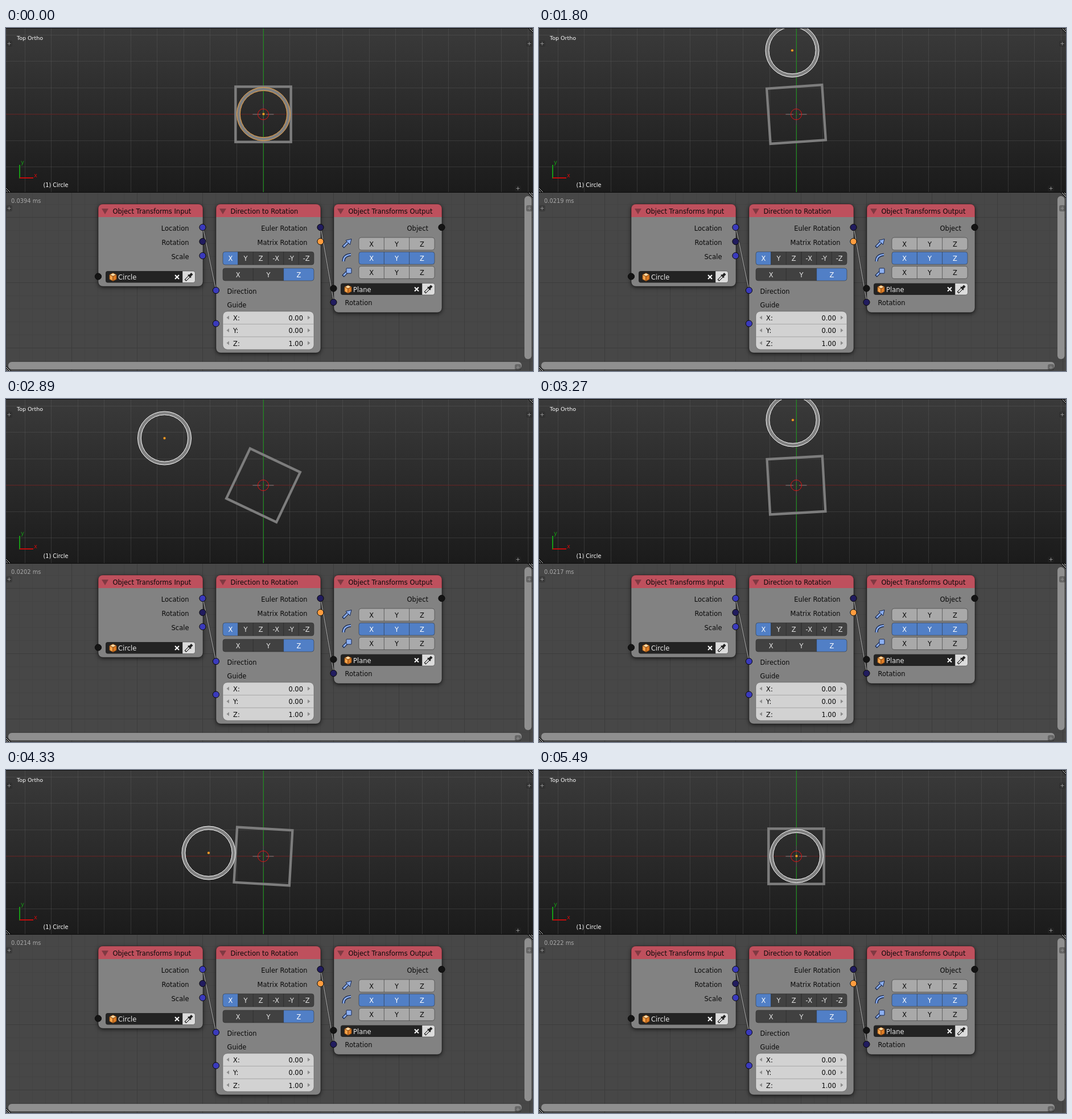
Animation, 926 px wide and 604 px high, one loop 5530 ms. Source, as an HTML page with a canvas:

```html
<!DOCTYPE html>
<html>
<head>
<meta charset="utf-8">
<title>Direction to Rotation</title>
<style>
html, body { margin: 0; width: 100%; height: 100%; overflow: hidden; background: #1a1a1a; }
canvas { display: block; }
</style>
</head>
<body>
<canvas id="stage" width="926" height="604"></canvas>
<script>
const c = document.getElementById('stage').getContext('2d');
const LOOP = 5530, STEPS = 119, CX = 452.5, CY = 151.5;
const BLUE = '#3a3abb', NAVY = '#211c5e', BLACK = '#141414', ORANGE = '#ff9d3f';
const SELECTED = '#517fc6', INK = '#0a0a0a';

// Key points of the hand-dragged circle: step, x, y
const drag = [[0, CX, CY], [13, 501, 142], [23, 595.5, 138.5], [26, 595, 126], [39, 445, 39.5], [51, 308, 63],
  [62, 278.5, 69], [70, 446, 37], [75, 601, 88], [79, 473, 40.5], [88, 320, 118], [93, 356, 146],
  [104, 425, 163], [112, CX, CY]];

// Cubic Hermite curve through the key points
function position(step) {
  const last = drag.length - 1;
  if (step >= drag[last][0]) return [CX, CY];
  const i = drag.findIndex(p => p[0] > step) - 1;
  const a = drag[i], b = drag[i + 1], d = b[0] - a[0], u = (step - a[0]) / d;
  const slope = (j, k) => {
    const p = drag[Math.max(j - 1, 0)], n = drag[Math.min(j + 1, last)];
    return (n[k] - p[k]) / (n[0] - p[0]);
  };
  return [1, 2].map(k =>
    (1 + 2 * u) * (1 - u) ** 2 * a[k] + u * (1 - u) ** 2 * d * slope(i, k) +
    u * u * (3 - 2 * u) * b[k] + u * u * (u - 1) * d * slope(i + 1, k));
}

// Measured run time: slow at first, then steady with jitter
function runTime(step) {
  const noise = Math.abs(Math.sin(step * 127.1) * 437) % 1;
  const units = step < 30 ? 394 - noise * 26 : 224 - noise * 38;
  return '0.0' + Math.round(units) + ' ms';
}

function line(points, color, width = 1) {
  c.beginPath();
  points.forEach(([x, y]) => c.lineTo(x, y));
  c.strokeStyle = color;
  c.lineWidth = width;
  c.stroke();
}

function paint(fill, stroke, width = 1) {
  if (fill) { c.fillStyle = fill; c.fill(); }
  if (stroke) { c.strokeStyle = stroke; c.lineWidth = width; c.stroke(); }
}

function poly(points, fill, stroke) {
  c.beginPath();
  points.forEach(([x, y]) => c.lineTo(x, y));
  c.closePath();
  paint(fill, stroke);
}

function box(x, y, w, h, r, fill, stroke) {
  c.beginPath();
  c.roundRect(x, y, w, h, r);
  paint(fill, stroke);
}

function disc(x, y, r, fill, stroke, width) {
  c.beginPath();
  c.arc(x, y, r, 0, 7);
  paint(fill, stroke, width);
}

function text(s, x, y, color = INK, align = 'left', size = 11.5) {
  c.font = size + 'px "DejaVu Sans", sans-serif';
  c.textAlign = align;
  c.fillStyle = color;
  c.fillText(s, x, y);
}

function grid(x0, y0, step, top, bottom, color) {
  for (let x = x0; x < 926; x += step) line([[Math.floor(x) + .5, top], [Math.floor(x) + .5, bottom]], color);
  for (let y = y0; y < bottom; y += step) line([[0, Math.floor(y) + .5], [926, Math.floor(y) + .5]], color);
}

function areaMarks(top, bottom) {
  for (let d = 0; d < 9; d += 2) {
    const color = d % 4 ? '#b0b0b0' : '#080808';
    line([[917 + d, top], [926, top + 9 - d]], color);
    line([[0, bottom - 9 + d], [9 - d, bottom]], color);
  }
  for (const [x, y] of [[5.5, top + 27.5], [919.5, top + 27.5], [899.5, bottom - 6.5]]) {
    box(x - 5.5, y - 5.5, 11, 11, 3, 'rgba(40,40,40,.4)');
    line([[x - 3, y], [x + 3, y]], '#8c8c8c');
    line([[x, y - 3], [x, y + 3]], '#8c8c8c');
  }
}

function viewport(step) {
  c.save();
  c.beginPath();
  c.rect(0, 1, 926, 288);
  c.clip();
  const shade = c.createLinearGradient(0, 0, 0, 289);
  shade.addColorStop(0, '#3a3a3a');
  shade.addColorStop(1, '#1b1b1b');
  c.fillStyle = shade;
  c.fillRect(0, 0, 926, 289);
  grid(33, 12.1, 46.55, 0, 289, 'rgba(100,100,100,.34)');
  line([[0, 152], [926, 152]], '#621a1a');
  line([[452.5, 0], [452.5, 289]], '#159015');

  const [x, y] = position(step);
  c.save();
  c.translate(452, 152);
  c.rotate(Math.atan2(y - CY, x - CX));
  c.strokeStyle = '#7d7d7d';
  c.lineWidth = 4.3;
  c.strokeRect(-48.7, -48.7, 97.4, 97.4);
  c.restore();

  const edge = step ? '#fff' : '#f5a542';
  disc(x, y, 44, null, '#808080', 6);
  disc(x, y, 47, null, edge);
  disc(x, y, 41.2, null, edge);
  disc(x, y, 2.3, '#ffa02d', '#5a3a10', .6);

  for (const s of [-1, 1]) {
    line([[452 + s * 5, 152], [452 + s * 18.5, 152]], '#808080');
    line([[452.5, 152 + s * 5], [452.5, 152 + s * 18.5]], '#4a564a');
  }
  disc(452, 152, 9.5, null, '#e41212');

  line([[24, 241], [24, 265]], '#169a16', 2);
  line([[24, 264], [48, 264]], '#c40c0c', 2);
  text('y', 26, 240, '#169a16', 'left', 10);
  text('x', 49, 263, '#c40c0c', 'left', 10);
  text('Top Ortho', 19, 20.5, '#fff', 'left', 9.5);
  text('(1) Circle', 65.5, 279.5, '#fff', 'left', 9.7);
  areaMarks(0, 289);
  c.restore();
}

function node(x, w, h, title) {
  c.save();
  c.shadowColor = 'rgba(0,0,0,.65)';
  c.shadowBlur = 7;
  c.shadowOffsetY = 2;
  box(x, 310, w, h, 8, '#828282');
  c.restore();
  box(x, 310, w, 23, [8, 8, 0, 0], '#be505d');
  box(x, 310, w, h, 8, null, 'rgba(0,0,0,.4)');
  poly([[x + 6, 318], [x + 18, 318], [x + 12, 328]], '#803942');
  text(title, x + 25.5, 327);
}

function socket(x, y, color) {
  disc(x, y, 5.6, color, '#080808', 1);
}

function buttons(x, y, w, h, labels, isOn, off, ink) {
  const step = w / labels.length;
  c.save();
  c.beginPath();
  c.roundRect(x, y, w, h, 4);
  c.clip();
  labels.forEach((s, i) => {
    const on = isOn(i), left = x + i * step;
    c.fillStyle = on ? SELECTED : off;
    c.fillRect(left, y, step, h);
    if (i) line([[left, y], [left, y + h]], 'rgba(0,0,0,.4)');
    text(s, left + step / 2, y + h / 2 + 4.5, on ? '#fff' : ink, 'center');
  });
  c.restore();
  box(x, y, w, h, 4, null, 'rgba(40,40,40,.5)');
}

function picker(x, y, w, name) {
  const m = y + 10.5, e = x + w, k = x + 13, rim = '#8c4a12';
  box(x, y, w, 20.5, [4, 0, 0, 4], '#232323');
  box(e, y, 22.5, 20.5, [0, 4, 4, 0], '#dcdcdc', 'rgba(40,40,40,.5)');
  poly([[k - 6, m - 4], [k, m - 7], [k + 6, m - 4], [k, m - 1]], '#ffdda8', rim);
  for (const [s, fill] of [[-1, '#f6a44a'], [1, '#df7d25']])
    poly([[k + 6 * s, m - 4], [k, m - 1], [k, m + 7], [k + 6 * s, m + 4]], fill, rim);
  text(name, x + 22, m + 4.5, '#e6e6e6');
  for (const s of [-1, 1]) line([[e - 13, m - 3.5 * s], [e - 6, m + 3.5 * s]], '#fff', 2);
  line([[e + 5, m + 6], [e + 13, m - 2]], '#222', 4);
  line([[e + 6, m + 5], [e + 12, m - 1]], '#fff', 1.8);
  line([[e + 10, m - 4], [e + 15, m + 1]], '#222', 2.2);
  line([[e + 13, m - 2], [e + 17, m - 6]], '#222', 4.5);
}

function transformIcons() {
  const dark = '#14254f', pale = '#8db0f0';
  const shaft = y => {
    line([[592, y + 7], [602, y - 3]], dark, 5);
    line([[593, y + 6], [602, y - 3]], pale, 2.6);
  };
  shaft(379);
  poly([[597, 374], [607, 371.5], [604.5, 381.5]], pale, dark);
  for (const [color, width] of [[dark, 5], [pale, 2.6]]) {
    c.beginPath();
    c.moveTo(593, 411);
    c.quadraticCurveTo(593, 400, 606, 399);
    c.strokeStyle = color;
    c.lineWidth = width;
    c.stroke();
  }
  shaft(430);
  box(598, 423, 9, 9, 1, pale, dark);
}

function vectorField(x, y, w, values) {
  const row = 22.4;
  box(x, y, w, row * values.length, 8, '#d2d2d2', 'rgba(60,60,60,.4)');
  values.forEach((value, i) => {
    const top = y + i * row, m = top + 11.5;
    if (i) line([[x, top], [x + w, top]], '#a6a6a6');
    text('XYZ'[i] + ':', x + 18, m + 4.5);
    text(value, x + w - 19, m + 4.5, INK, 'right');
    for (const [px, s] of [[x + 11, -1], [x + w - 11, 1]])
      poly([[px, m - 4], [px, m + 3], [px + 4.5 * s, m - .5]], '#8c8c8c');
  });
}

function editor(step) {
  c.fillStyle = '#474747';
  c.fillRect(0, 290, 926, 314);
  grid(0, 310, 23, 290, 604, '#434343');
  grid(0, 333, 115, 290, 604, '#3c3c3c');
  text(runTime(step), 9, 308, '#a8a8a8', 'left', 9.9);
  box(911, 296, 12.5, 287, 6, '#8f8f8f');
  box(4, 588, 902, 13, 6, '#8f8f8f');
  areaMarks(290, 604);

  node(162, 184, 145, 'Object Transforms Input');
  node(369, 184, 262, 'Direction to Rotation');
  node(576, 190, 191, 'Object Transforms Output');

  ['Location', 'Rotation', 'Scale'].forEach((s, i) => text(s, 321.5, 356.5 + i * 25.2, INK, 'right'));
  picker(175, 428, 135, 'Circle');

  ['Euler Rotation', 'Matrix Rotation'].forEach((s, i) => text(s, 529.5, 356.5 + i * 25.2, INK, 'right'));
  buttons(381, 394, 160, 23, ['X', 'Y', 'Z', '-X', '-Y', '-Z'], i => i === 0, '#414141', '#e4e4e4');
  buttons(381, 423, 160, 22, ['X', 'Y', 'Z'], i => i === 2, '#414141', '#e4e4e4');
  text('Direction', 388.5, 467.5);
  text('Guide', 388.5, 491.5);
  vectorField(381, 499, 160, ['0.00', '0.00', '1.00']);

  text('Object', 742, 356.5, INK, 'right');
  for (let i = 0; i < 3; i++)
    buttons(620, 369 + i * 25.2, 133, 22, ['X', 'Y', 'Z'], () => i === 1, '#a9a9a9', INK);
  transformIcons();
  picker(588, 449.5, 143, 'Plane');
  text('Rotation', 595.5, 488);

  for (const link of [[[346, 351], [369, 462]], [[553, 351], [576, 483]]]) {
    line(link, 'rgba(20,20,20,.45)', 2.6);
    line(link, '#b0b0b0', 1.1);
  }
  [BLUE, NAVY, BLUE].forEach((color, i) => socket(345.5, 351 + i * 25, color));
  [NAVY, ORANGE].forEach((color, i) => socket(552.5, 351 + i * 25, color));
  socket(765.5, 351, BLACK);
  socket(162, 437.5, BLACK);
  socket(369, 462, BLUE);
  socket(369, 520.5, BLUE);
  socket(575.5, 458.5, BLACK);
  socket(575.5, 483, NAVY);
}

function draw() {
  const t = performance.now() % LOOP;
  const step = Math.floor(t / LOOP * STEPS + .3) % STEPS;
  c.fillStyle = '#0c0c0c';
  c.fillRect(0, 0, 926, 604);
  viewport(step);
  editor(step);
  requestAnimationFrame(draw);
}
draw();
</script>
</body>
</html>
```
